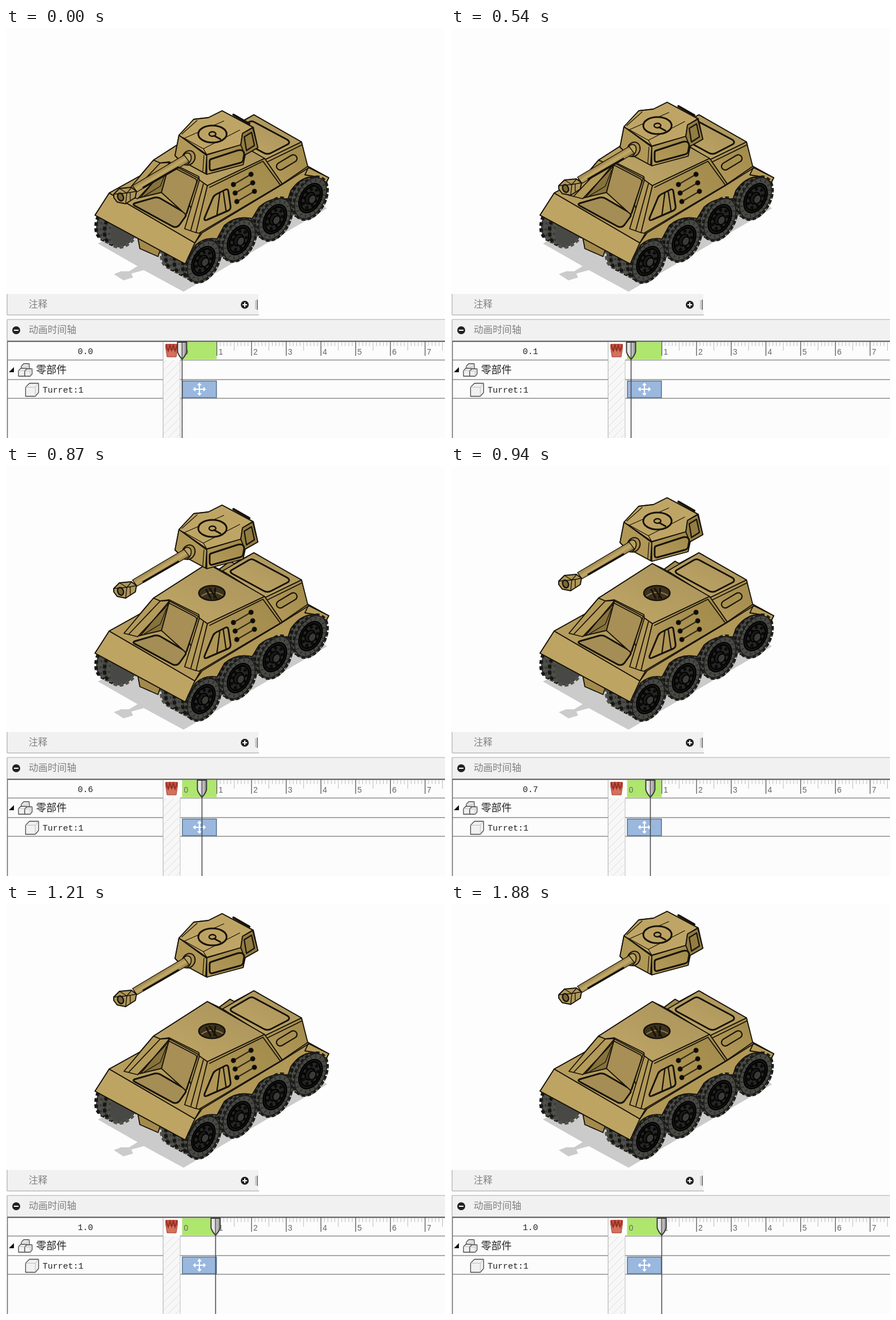
An HTML page for the animation above (1.95 s loop, 774 px wide and 723 px high).

```html
<!DOCTYPE html>
<html lang="zh">
<head>
<meta charset="utf-8">
<style>
html, body { margin: 0; width: 100%; height: 100%; overflow: hidden; background: #fdfdfd; }
svg { display: block; width: 100vw; height: 100vh; }
text { font-family: "Noto Sans CJK SC", "Noto Sans", sans-serif; fill: #222; }
.mono { font: 15px "Liberation Mono", monospace; }
.num { font: 14px "Liberation Sans", sans-serif; fill: #666; }
.bar { fill: #808080; font-weight: 300; }
</style>
</head>
<body>
<svg id="stage" viewBox="0 0 774 723">
  <defs>
    <linearGradient id="roof" x1="0" y1="1" x2="1" y2="0">
      <stop offset="0" stop-color="#c1a767"/><stop offset="1" stop-color="#a8925a"/>
    </linearGradient>
    <linearGradient id="side" x1="0" y1="1" x2="1" y2="0">
      <stop offset="0" stop-color="#b69c5c"/><stop offset="1" stop-color="#a08949"/>
    </linearGradient>
    <linearGradient id="barrel" gradientUnits="userSpaceOnUse" x1="270" y1="119" x2="278" y2="132">
      <stop offset="0" stop-color="#a58d4f"/><stop offset=".4" stop-color="#c4aa6a"/><stop offset="1" stop-color="#8a7540"/>
    </linearGradient>
    <linearGradient id="steel">
      <stop offset="0" stop-color="#f4f4f4"/><stop offset=".5" stop-color="#d4d4d4"/><stop offset="1" stop-color="#8d8d8d"/>
    </linearGradient>
    <pattern id="hatch" width="14" height="14" patternUnits="userSpaceOnUse">
      <path d="M-1 15L15 -1" stroke="#dcdcdc"/>
    </pattern>
  </defs>
  <g id="tank" stroke="#17130a" stroke-width="1.8" stroke-linejoin="round" stroke-linecap="round"></g>
  <g id="turret" stroke="#17130a" stroke-width="1.8" stroke-linejoin="round" stroke-linecap="round"></g>
  <g id="panel"></g>
  <g id="head">
    <path d="M0 553V723" stroke="#4a4a4a" stroke-width="1.6"/>
    <path d="M-8 554H8V571Q6 578 0 584Q-6 578 -8 571Z" fill="url(#steel)" stroke="#3a3a36" stroke-width="2"/>
    <path d="M0 555V582" stroke="#555" stroke-width="1.6"/>
  </g>
</svg>
<script>
const $ = id => document.getElementById(id);
const poly = (pts, fill, extra = '') => `<polygon points="${pts}" fill="${fill}" ${extra}/>`;
const path = (d, extra = '') => `<path d="${d}" fill="none" ${extra}/>`;
const rect = (x, y, w, h, fill, extra = '') =>
  `<rect x="${x}" y="${y}" width="${w}" height="${h}" fill="${fill}" ${extra}/>`;
const oval = (rx, ry, fill, extra = '') => `<ellipse rx="${rx}" ry="${ry}" fill="${fill}" ${extra}/>`;
const at = (x, y, body, turn = 0) => `<g transform="translate(${x} ${y}) rotate(${turn})">${body}</g>`;
const text = (x, y, str, extra = '') => `<text x="${x}" y="${y}" ${extra}>${str}</text>`;
const thick = 'stroke-width="3"';
const dash = (color, width, n, on = .6) =>
  `stroke="${color}" stroke-width="${width}" pathLength="${n}" stroke-dasharray="${on} ${1 - on}" stroke-linecap="butt"`;

const TILT = -61;
const wheels = [3, 2, 1, 0].map(i => [348 + 63 * i, 411 - 37 * i]);

// A row of lugged rings, from the far rim to the near one
function tread(x, y, n) {
  let out = '';
  for (let i = n; i >= 0; i--)
    out += at(x - 7.5 * i, y - 4 * i,
      oval(39, 24, '#484844', 'stroke="#222" stroke-width="1"') +
      oval(39, 25, 'none', dash(i % 2 ? '#161614' : '#50504b', 6, 19)), TILT);
  return out;
}

function face(x, y) {
  return at(x, y,
    oval(40, 25, 'none', dash('#1c1c1a', 6, 20)) +
    oval(39, 24, '#474743', 'stroke="#1a1a18" stroke-width="1.5"') +
    oval(34, 20.5, 'none', dash('#2a2a27', 5, 20, .2)) +
    oval(28, 18, '#151513', 'stroke="#000" stroke-width="2"') +
    oval(23, 14.5, '#262624', 'stroke="#000" stroke-width="2"') +
    oval(18, 11, 'none', dash('#0a0a0a', 6, 9, .5)), TILT) +
    at(x - 1, y, oval(11, 8, '#181816', 'stroke="#000"'), TILT) +
    at(x + 3, y + 2, oval(8, 6, '#3a3a37', 'stroke="#000"'), TILT);
}

const rail = i => {
  const x = 401 + 3 * i, y = 276 + 15 * i;
  return path(`M${x} ${y}L${x + 31} ${y - 18}`, 'stroke="#332b18" stroke-width="2.4"') +
    [[0, 0], [31, -18]].map(([a, b]) => `<circle cx="${x + a}" cy="${y + b}" r="3.6" fill="#0d0b06"/>`).join('');
};

$('tank').innerHTML =
  poly('162,380 190,365 540,300 566,318 313,465 243,427 221,433 224,440 207,445 190,434 203,429 217,429 232,420', '#cbcbcb', 'stroke="none"') +
  tread(210, 350, 3) +
  wheels.map(([x, y]) => tread(x, y, 6)).join('') +
  poly('232,368 272,391 268,403 236,389', '#a38a4c') +
  // silhouette with the wheel arches
  `<path fill="#b19857" d="M182 291L236 261L260 233L355 172L376 182L395 168L402 172L437 153L521 201L531 243L569 264L565 272L550 263
    Q522 258 502 287L497 302Q468 296 446 316L434 336Q406 330 385 348L372 372Q350 368 334 383L316 416L157 330Z"/>` +
  // front plate and deck
  poly('182,291 157,330 316,416 333,379', '#bea463') +
  poly('182,291 236,261 300,262 345,358 333,379', '#b69d5d') +
  path('M333 379L346 361L487 276L533 247') +
  path('M227 309L262 299Q268 298 273 301L314 325Q319 328 316 333L306 347Q301 353 294 350L228 314Q222 311 227 309Z', 'style="fill:#a58e55" ' + thick) +
  // rear deck
  poly('376,182 395,168 410,176 388,190', '#a28b4d') +
  poly('382,185 437,153 521,201 457,232', 'url(#roof)') +
  poly('457,232 521,201 532,244 487,275', 'url(#side)') +
  path('M461 236L522 206') +
  path('M397 184L428 166Q433 163 438 166L496 197Q502 201 497 205L468 220Q461 224 454 220L399 190Q394 187 397 184Z', thick) +
  at(495, 237, rect(-20, -6.5, 40, 13, '#a8914f', 'rx="6.5" stroke-width="2.2"'), -31) +
  poly('533,246 569,264 565,272 546,262 527,259', '#b59b59') +
  // cabin
  poly('260,233 355,172 456,230 355,278 341,269 340,262 288,236 272,238', 'url(#roof)') +
  poly('355,278 456,230 487,275 340,362 334,360', 'url(#side)') +
  path('M359 281L453 235L483 276') +
  poly('341,268 355,278 335,361 315,354', '#b39958') +
  path('M348 275L326 356') +
  poly('288,238 339,265 317,329 274,290', '#a78f55') +
  poly('288,238 274,290 232,300', '#87723c') +
  path('M283 251L272 279L244 296', 'stroke-width="1.2"') +
  poly('260,233 272,238 288,237 284,246 232,301 208,295', '#b49b5a') +
  path('M272 238L217 296M288 238L237 299') +
  path('M288 242L334 266Q337 268 336 272L319 327') +
  // side windows
  path('M350 335L365 299Q367 295 371 293L387 285Q391 283 392 288L396 315Q396 320 392 322L355 338Q349 341 350 335Z', thick) +
  path('M377 291L372 329M383 288L388 323', 'stroke-width="2.2"') +
  [0, 1, 2].map(rail).join('') +
  // turret ring
  at(363, 224, oval(23, 13, '#3d321d', 'stroke-width="2.6"') +
    path('M-18 5Q0 -7 19 4', 'stroke="#8d7846" stroke-width="2"') +
    path('M-10 -6L-2 9M-4 -8L8 9M6 -8L4 8', thick)) +
  wheels.map(([x, y]) => face(x, y)).join('');

$('turret').innerHTML =
  path('M401 20L429 36', 'stroke-width="4"') +
  poly('305,56 331,28 357,25 381,13 436,42 444,78 421,91 418,108 354,125 304,98 298,92', '#aa9252') +
  poly('305,56 298,92 304,98 352,124 354,92', '#b19857') +
  poly('305,56 331,28 357,25 381,13 435,42 417,53 414,73 354,90', '#bfa565') +
  poly('354,91 414,73 422,90 418,108 354,125', 'url(#side)') +
  poly('417,53 435,43 444,78 421,91 414,73', '#937d42') +
  path('M310 54L337 30M312 60L348 80L412 47M348 80L354 90M349 92L347 120M313 62L384 31', 'stroke-width="1.3"') +
  path('M362 98L408 83Q419 80 420 89L418 100Q417 104 412 105L364 118Q359 119 359 114V102Q359 99 362 98Z', thick) +
  path('M420 59L433 51L438 74L424 83Z', 'stroke-width="2.2"') +
  at(364, 54, oval(25, 15, '#bda363', thick) + oval(6, 4, '#b99e5c', 'stroke-width="2.4"') + path('M3 3L14 9', thick)) +
  at(322, 96, oval(11, 13, '#a88f50', 'stroke-width="2"'), 25) +
  at(318, 98, oval(8, 11, '#bba161'), 25) +
  poly('314,91 323,103 231,156 223,145', 'url(#barrel)', 'stroke-width="1.3"') +
  path('M241 149L305 112', 'stroke-width="3.6" stroke-linecap="butt"') +
  poly('190,160 200,150 221,148 230,155 228,166 211,177 196,174 190,166', '#b0975a', 'stroke-width="2"') +
  path('M200 150L213 158L211 177M190 160L213 158L230 155M221 149L213 158M219 157V170', 'stroke-width="1.4"') +
  at(202, 165, oval(5, 7, '#7b6838', 'stroke-width="2.4"'), -20);

const line = (x1, y1, x2, y2, color, w = 1.5) => path(`M${x1} ${y1}L${x2} ${y2}`, `stroke="${color}" stroke-width="${w}"`);
const button = (x, y, plus) => `<circle cx="${x}" cy="${y}" r="7" fill="#222"/>` +
  path(`M${x - 4} ${y}h8` + (plus ? `M${x} ${y - 4}v8` : ''), 'stroke="#fff" stroke-width="2"');
const cube = (x, y, s) => at(x, y,
  `<path d="M0 ${s * .3}L${s * .3} 0H${s}V${s * .7}L${s * .75} ${s}H0Z" fill="#f1f1f1" stroke="#444" stroke-width="1.3" stroke-linejoin="round"/>` +
  path(`M0 ${s * .3}H${s * .75}V${s}M${s * .75} ${s * .3}L${s} 0`, 'stroke="#bbb"'));

const UNIT = 61.2, ZERO = 310.5;
let ruler = '';
for (let i = 10; i < 76; i++) {
  const x = ZERO + i * UNIT / 10;
  ruler += i % 10 ? line(x, 554, x, i % 5 ? 561 : 569, '#bbb', 1) : line(x, 553, x, 578, '#555', 1.3);
}
for (let i = 0; i < 8; i++) ruler += text(ZERO + i * UNIT + 3, 576, i, 'class="num"');

const rows = [585.5, 620, 653];
$('panel').innerHTML =
  rect(2, 469, 443, 37, '#f1f1f1') + line(2, 469, 2, 506, '#bbb') + line(2, 506, 446, 506, '#bbb') +
  text(40, 493, '注释', 'class="bar" font-size="16.5"') + button(421, 488, true) +
  line(440, 480, 440, 496, '#999', 1) + line(443, 479, 443, 497, '#555', 1.5) +
  rect(2, 514, 772, 38, '#f1f1f1') + line(2, 514, 774, 514, '#c4c4c4') + line(2, 514, 2, 552, '#bbb') +
  text(40, 538, '动画时间轴', 'class="bar" font-size="16.8"') + button(18, 533) +
  rect(2, 553, 772, 170, '#fcfcfc') +
  rect(277, 586, 29, 137, '#f7f7f7') + rect(277, 586, 29, 137, 'url(#hatch)') +
  rect(ZERO, 554, 61, 30, '#aee66e') + ruler +
  rows.map(y => line(2, y, 277, y, '#8c8c8c') + line(307, y, 774, y, '#8c8c8c')).join('') +
  line(2, 552.5, 774, 552.5, '#505050', 2) + line(2.5, 552, 2.5, 723, '#666') +
  line(277, 553, 277, 723, '#aaa', 1) + line(307, 586, 307, 723, '#bbb', 1) +
  text(140, 575, '0.0', 'id="clock" class="mono" text-anchor="middle"') +
  poly('5,607 14,607 14,598', '#111') +
  cube(27, 592, 14) + cube(22, 600, 14) + cube(33, 601, 13) +
  text(53, 609, '零部件', 'font-size="18" font-weight="300"') +
  cube(34.5, 626.5, 23) + text(64.5, 643, 'Turret:1', 'class="mono"') +
  // marker at the start of the ruler
  poly('282,567 302,567 300,580 284,580', '#d4705b', 'stroke="#9c3d30"') +
  rect(281, 557, 22, 10, '#c4503f', 'rx="1.5"') +
  path('M282 558L286 570L289 559L292 569L295 559L298 570L302 558', 'stroke="#8a2b22" stroke-width="1.6"') +
  rect(311, 622.5, 60, 29.5, '#9ab8de', 'stroke="#5b7595" stroke-width="1.6"') +
  at(341, 637, path('M-10 0H10M0 -10V10M-7 -3L-10 0L-7 3M7 -3L10 0L7 3M-3 -7L0 -10L3 -7M-3 7L0 10L3 7',
    'stroke="#fff" stroke-width="2"'));

const LOOP = 1950, LIFT = 133;
function draw(now) {
  const t = now % LOOP;
  const step = t < 330 ? 0 : Math.min(15, Math.floor((t - 324) / 67.9));
  const u = Math.min(1, step / 14.5);
  const p = u * u * (3 - 2 * u);
  $('turret').setAttribute('transform', `translate(0 ${Math.round(LIFT * (1 - p))})`);
  $('head').setAttribute('transform', `translate(${ZERO + Math.round(p * 61)} 0)`);
  $('clock').textContent = p.toFixed(1);
  requestAnimationFrame(draw);
}
draw(0);
</script>
</body>
</html>
```
